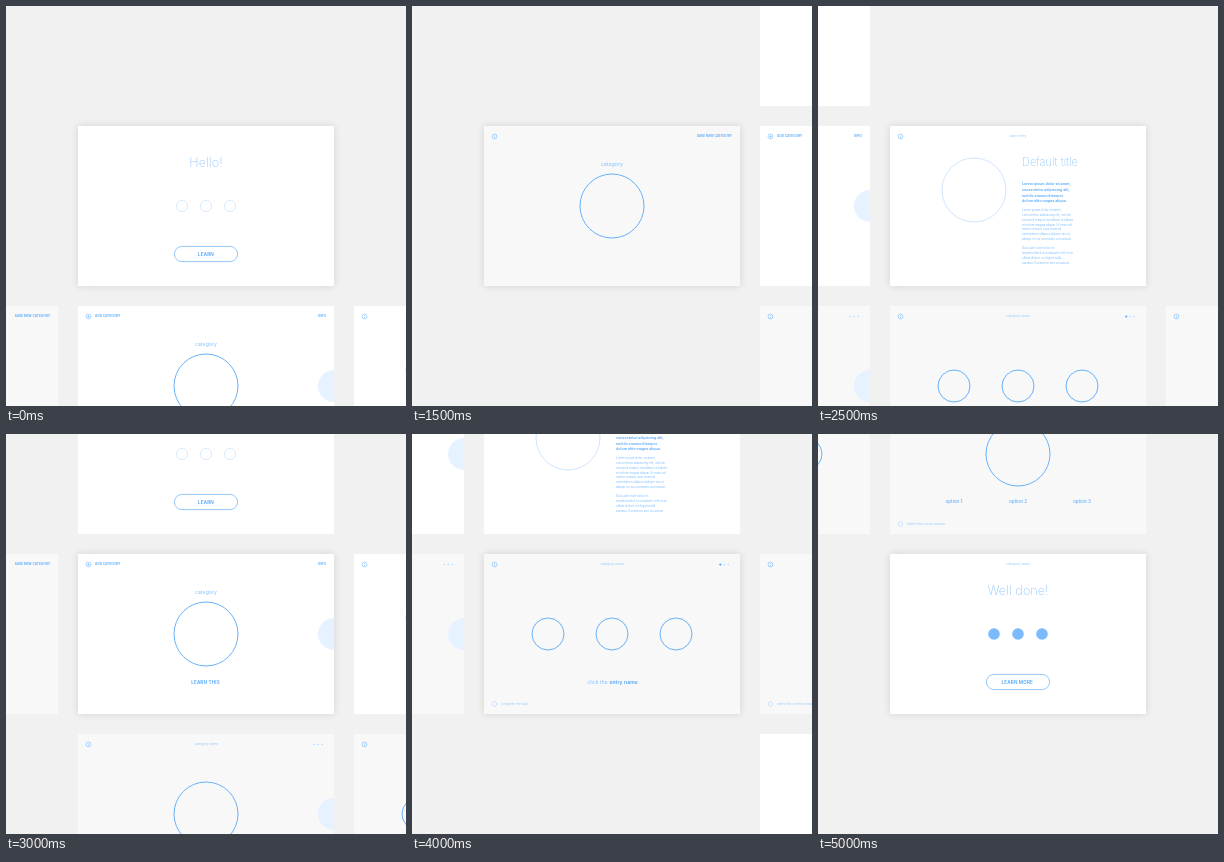
An HTML page that plays this animation: 400x400 px, repeating every 6 s.

```html
<!DOCTYPE html>
<html lang="en">
<head>
<meta charset="utf-8">
<title>Screen map</title>
<style>
html, body { margin: 0; width: 100%; height: 100%; overflow: hidden; background: #f1f1f1; }
#stage { display: block; width: 400px; height: 400px; }
#frame { position: absolute; left: 72px; top: 120px; width: 256px; height: 160px; box-shadow: 0 0 8px rgba(0,0,0,.12); }
#stage { position: relative; }
text { font-family: Inter, "Open Sans", sans-serif; fill: #62aefa; }
.mid { text-anchor: middle; }
.end { text-anchor: end; }
.title { font-size: 12.7px; font-weight: 200; fill: #94c8fd; }
.act { font-size: 4.6px; font-weight: 600; letter-spacing: .15px; fill: #4ea4f8; }
.nav { font-size: 3.2px; font-weight: 700; }
.tag { font-size: 3.3px; fill: #94c8fd; }
.hint { font-size: 3.2px; fill: #94c8fd; }
.label { font-size: 5px; letter-spacing: .1px; fill: #7cbcfc; }
.option { font-size: 4.6px; font-weight: 500; }
.lead { font-size: 3.6px; font-weight: 700; }
.body { font-size: 3.02px; fill: #7cbcfc; }
.line { fill: none; stroke: #67b1fa; }
.thin { fill: none; stroke: #67b1fa; stroke-width: .55; }
.pale { fill: none; stroke: #cfe5fe; }
.soft { fill: #e6f2ff; }
.solid { fill: #7abafd; }
.white { fill: #fff; }
.grey { fill: #f8f8f8; }

/* The camera hops from screen to screen on a 276 x 180 grid. */
#world { animation: hop 6s step-end infinite; }
@keyframes hop {
  0% { transform: translate(72px, 120px); }
  16.666% { transform: translate(72px, -60px); }
  25% { transform: translate(348px, -60px); }
  33.333% { transform: translate(72px, -60px); }
  41.666% { transform: translate(-204px, -60px); }
  50% { transform: translate(72px, -60px); }
  58.333% { transform: translate(72px, -240px); }
  66.666% { transform: translate(-204px, -240px); }
  75% { transform: translate(-480px, -240px); }
  83.333%, 100% { transform: translate(-480px, -420px); }
}
</style>
</head>
<body>
<div id="frame"></div>
<svg id="stage" viewBox="0 0 400 400">
  <defs>
    <rect id="white" class="white" width="256" height="160"/>
    <rect id="grey" class="grey" width="256" height="160"/>
    <g id="info" class="thin"><circle cx="10.5" cy="10.5" r="2.4"/><path d="M10.5 9.2v.5M10.5 10.2v1.6"/></g>
    <g id="plus" class="thin"><circle cx="10.5" cy="10.5" r="2.4"/><path d="M10.5 9.2v2.6M9.2 10.5h2.6"/></g>
    <circle id="ring" class="line" cx="128" cy="80" r="32"/>
    <circle id="next" class="soft" cx="256" cy="80" r="16"/>
    <rect id="button" class="line" x="96.4" y="120.4" width="63.2" height="15.2" rx="7.6" stroke-width=".7"/>
    <g id="steps" fill="#b3d7fe"><circle cx="236.3" cy="10.5" r=".8"/><circle cx="240.3" cy="10.5" r=".8"/><circle cx="244.3" cy="10.5" r=".8"/></g>
    <circle id="check" cx="10.5" cy="150" r="2.3" fill="none" stroke="#a5d0fe" stroke-width=".5"/>
  </defs>
  <g id="world">
    <svg width="256" height="160">
      <use href="#white"/>
      <text class="title mid" x="128" y="40.6">Hello!</text>
      <g class="pale" stroke-width=".8">
        <circle cx="104" cy="80" r="5.6"/><circle cx="128" cy="80" r="5.6"/><circle cx="152" cy="80" r="5.6"/>
      </g>
      <use href="#button"/>
      <text class="act mid" x="128" y="129.7">LEARN</text>
    </svg>

    <svg x="-276" y="180" width="256" height="160">
      <use href="#grey"/>
      <use href="#info"/>
      <text class="nav end" x="248" y="11.4">SAVE NEW CATEGORY</text>
      <text class="label mid" x="128" y="39.9">category</text>
      <use href="#ring"/>
    </svg>

    <svg y="180" width="256" height="160">
      <use href="#white"/>
      <use href="#plus"/>
      <text class="nav" x="17" y="11.4">ADD CATEGORY</text>
      <text class="nav end" x="248" y="11.4">INFO</text>
      <text class="label mid" x="128" y="39.9">category</text>
      <use href="#ring"/>
      <use href="#next"/>
      <text class="act mid" x="127.5" y="129.7">LEARN THIS</text>
    </svg>

    <svg x="276" y="180" width="256" height="160">
      <use href="#white"/>
      <use href="#info"/>
      <text class="tag mid" x="128" y="10.7">learn entry</text>
      <circle class="pale" cx="84" cy="64" r="32"/>
      <text class="title" x="132" y="40.4" style="font-size:11px">Default title</text>
      <text class="lead">
        <tspan x="132" y="59.3">Lorem ipsum dolor sit amet,</tspan>
        <tspan x="132" dy="5.6">consectetur adipiscing elit,</tspan>
        <tspan x="132" dy="5.6">sed do eiusmod tempor</tspan>
        <tspan x="132" dy="5.6">dolore elito magna aliqua.</tspan>
      </text>
      <text class="body">
        <tspan x="132" y="85.3">Lorem ipsum dolor sit amet,</tspan>
        <tspan x="132" dy="4.78">consectetur adipiscing elit, sed do</tspan>
        <tspan x="132" dy="4.78">eiusmod tempor incididunt ut labore</tspan>
        <tspan x="132" dy="4.78">et dolore magna aliqua. Ut enim ad</tspan>
        <tspan x="132" dy="4.78">minim veniam, quis nostrud</tspan>
        <tspan x="132" dy="4.78">exercitation ullamco laboris nisi ut</tspan>
        <tspan x="132" dy="4.78">aliquip ex ea commodo consequat.</tspan>
        <tspan x="132" dy="9.5">Duis aute irure dolor in</tspan>
        <tspan x="132" dy="4.78">reprehenderit in voluptate velit esse</tspan>
        <tspan x="132" dy="4.78">cillum dolore eu fugiat nulla</tspan>
        <tspan x="132" dy="4.78">pariatur. Excepteur sint occaecat.</tspan>
      </text>
    </svg>

    <svg y="360" width="256" height="160">
      <use href="#grey"/>
      <use href="#info"/>
      <text class="tag mid" x="128" y="10.7">category name</text>
      <use href="#steps"/>
      <use href="#ring"/>
      <use href="#next"/>
      <text class="act mid" x="127.5" y="129.7">TEST THIS</text>
    </svg>

    <svg x="276" y="360" width="256" height="160">
      <use href="#grey"/>
      <use href="#info"/>
      <text class="tag mid" x="128" y="10.7">category name</text>
      <use href="#steps"/>
      <circle cx="236.3" cy="10.5" r="1" fill="#4ea4f8"/>
      <g class="line">
        <circle cx="64" cy="80" r="16"/><circle cx="128" cy="80" r="16"/><circle cx="192" cy="80" r="16"/>
      </g>
      <text class="label mid" x="128.5" y="129.5">click the <tspan font-weight="600" fill="#4ea4f8">entry name</tspan></text>
      <use href="#check"/>
      <text class="hint" x="17" y="150.9">complete the task</text>
    </svg>

    <svg x="552" y="360" width="256" height="160">
      <use href="#grey"/>
      <use href="#info"/>
      <text class="tag mid" x="128" y="10.7">category name</text>
      <use href="#steps"/>
      <circle cx="240.3" cy="10.5" r="1" fill="#4ea4f8"/>
      <use href="#ring"/>
      <text class="option mid" x="64" y="129.4">option 1</text>
      <text class="option mid" x="128" y="129.4">option 2</text>
      <text class="option mid" x="192" y="129.4">option 3</text>
      <use href="#check"/>
      <text class="hint" x="17" y="150.9">select the correct answer</text>
    </svg>

    <svg x="552" y="540" width="256" height="160">
      <use href="#white"/>
      <text class="tag mid" x="128" y="10.7">category name</text>
      <text class="title mid" x="128" y="40.6">Well done!</text>
      <g class="solid">
        <circle cx="104" cy="80" r="5.8"/><circle cx="128" cy="80" r="5.8"/><circle cx="152" cy="80" r="5.8"/>
      </g>
      <use href="#button"/>
      <text class="act mid" x="127.3" y="129.7" font-weight="500">LEARN MORE</text>
    </svg>
  </g>
</svg>
</body>
</html>
```
